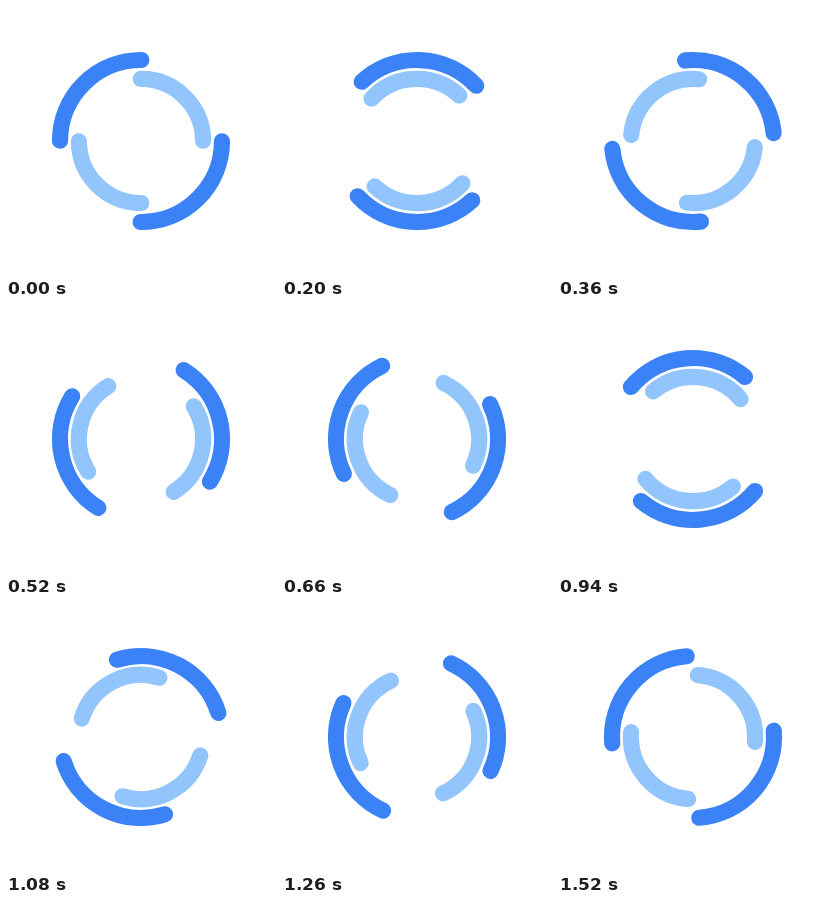
These frames come from a looping animation (270 by 270 pixels, 1.54 s). An HTML page:

```html
<!DOCTYPE html>
<html lang="en">
<head>
<meta charset="utf-8">
<title>Double ring spinner</title>
<style>
  html, body { margin: 0; width: 100%; height: 100%; overflow: hidden; background: #fff; }
  svg { display: block; width: 100vw; height: 100vh; }
  path { fill: none; stroke-width: 16.2; stroke-linecap: round; }
</style>
</head>
<body>
<svg viewBox="0 0 270 270">
  <g id="outer"><path stroke="#3b82f6"></path></g>
  <g id="inner"><path stroke="#93c5fd"></path></g>
</svg>
<script>
  const LOOP = 1540;
  const CENTER = 135;
  const outer = document.getElementById('outer');
  const inner = document.getElementById('inner');

  // Two opposite quarter arcs: right-bottom and left-top
  const arcs = r =>
    `M${r} 0A${r} ${r} 0 0 1 0 ${r}M${-r} 0A${r} ${r} 0 0 1 0 ${-r}`;

  const turn = (ring, deg) =>
    ring.setAttribute('transform', `translate(${CENTER} ${CENTER}) rotate(${deg})`);

  function draw(ms) {
    const angle = (ms % LOOP) / LOOP * 360;
    turn(outer, angle);
    turn(inner, 90 - angle);
  }

  function tick(now) {
    draw(now);
    requestAnimationFrame(tick);
  }

  outer.firstElementChild.setAttribute('d', arcs(81));
  inner.firstElementChild.setAttribute('d', arcs(62.1));
  draw(0);
  requestAnimationFrame(tick);
</script>
</body>
</html>
```
